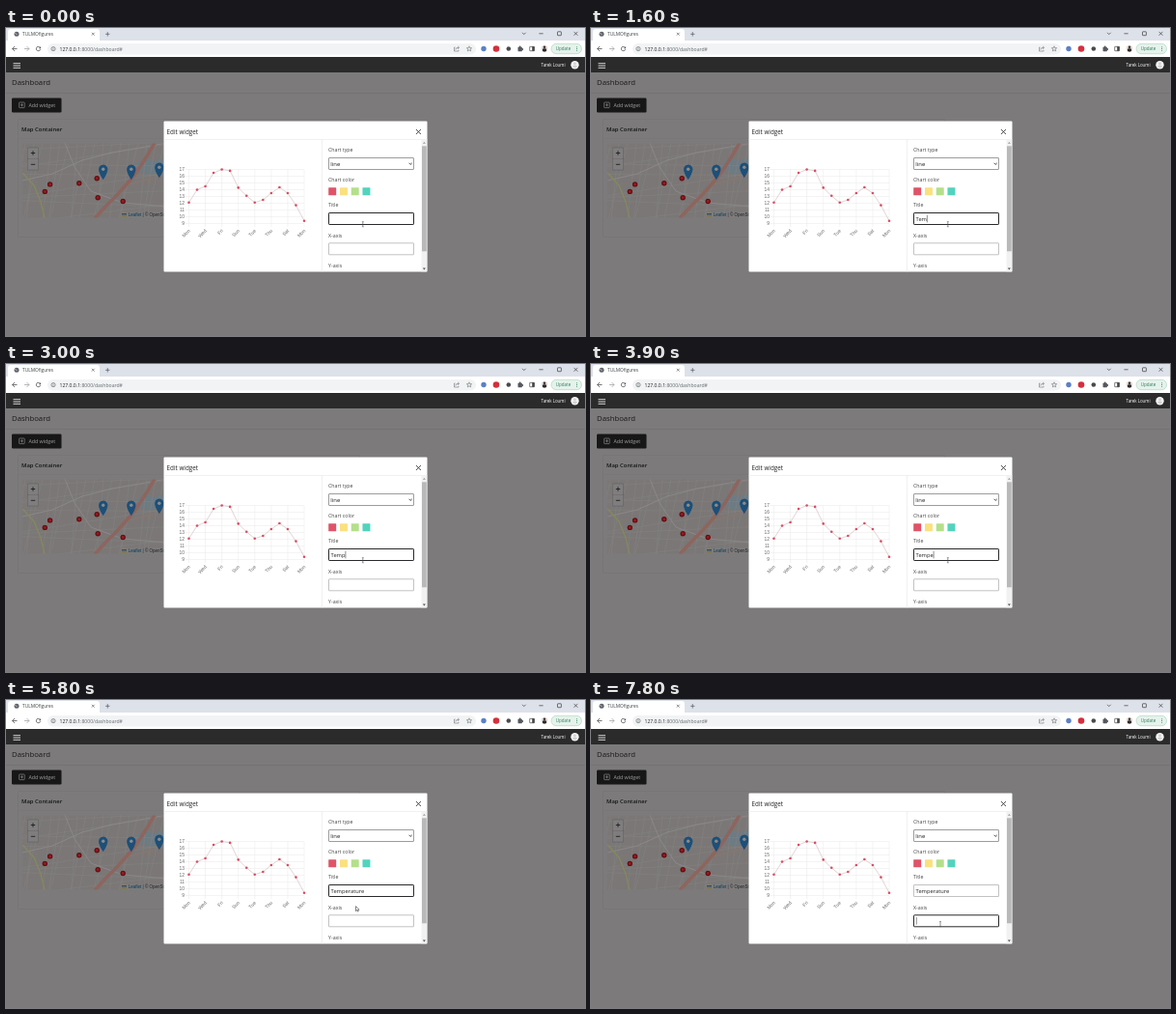
Animation, 600 px wide and 319 px high, one loop 8000 ms. Source, as an HTML page with a canvas:

```html
<!DOCTYPE html>
<html lang="en">
<head>
<meta charset="utf-8">
<title>Dashboard</title>
<style>
html, body { margin: 0; width: 100%; height: 100%; overflow: hidden; background: #7c7a7b; }
canvas { display: block; width: 600px; height: 319px; }
</style>
</head>
<body>
<canvas id="stage"></canvas>
<script>
const W = 600, H = 319, LOOP = 8000;
const UI = '"Open Sans", "Noto Sans", sans-serif';
const ARIAL = '"Liberation Sans", Arial, sans-serif';
const canvas = document.getElementById('stage');
const ratio = window.devicePixelRatio || 1;
canvas.width = W * ratio;
canvas.height = H * ratio;
const c = canvas.getContext('2d');
c.scale(ratio, ratio);

function rect(x, y, w, h, fill, r = 0) {
  c.fillStyle = fill;
  c.beginPath();
  c.roundRect(x, y, w, h, r);
  c.fill();
}
function frame(x, y, w, h, color, width = 1, r = 0) {
  c.strokeStyle = color;
  c.lineWidth = width;
  c.beginPath();
  c.roundRect(x, y, w, h, r);
  c.stroke();
}
function dot(x, y, r, fill) {
  c.fillStyle = fill;
  c.beginPath();
  c.arc(x, y, r, 0, Math.PI * 2);
  c.fill();
}
function ring(x, y, r, color, width, from = 0, to = Math.PI * 2) {
  c.strokeStyle = color;
  c.lineWidth = width;
  c.beginPath();
  c.arc(x, y, r, from, to);
  c.stroke();
}
function path(points, color, width = 1, fill) {
  c.beginPath();
  points.forEach(([x, y]) => c.lineTo(x, y));
  if (fill) {
    c.closePath();
    c.fillStyle = fill;
    c.fill();
  }
  if (color) {
    c.strokeStyle = color;
    c.lineWidth = width;
    c.stroke();
  }
}
const line = (x1, y1, x2, y2, color, width) => path([[x1, y1], [x2, y2]], color, width);
function cross(x, y, r, color, width) {
  line(x - r, y - r, x + r, y + r, color, width);
  line(x - r, y + r, x + r, y - r, color, width);
}
function plus(x, y, r, color, width) {
  line(x - r, y, x + r, y, color, width);
  line(x, y - r, x, y + r, color, width);
}
function text(str, x, y, size, color, { weight = 400, align = 'left', font = UI } = {}) {
  c.font = `${weight} ${size}px ${font}`;
  c.fillStyle = color;
  c.textAlign = align;
  c.fillText(str, x, y);
  return c.measureText(str).width;
}

function drawBrowser() {
  const ink = '#55585c', control = '#3a3a3c';
  rect(0, 0, W, 14, '#dde1e9');
  rect(2, 1, 95, 15, '#fff', 3);
  rect(0, 13, W, 17, '#fff');
  dot(11, 6.3, 2.5, '#5f6368');
  line(9.2, 5.5, 11.6, 6.6, '#d5d7da', 0.7);
  text('TULMOfigures', 17, 8.4, 4.8, '#3c4043');
  cross(90.3, 6.2, 1.4, ink, 0.7);
  plus(105.3, 6.3, 2.2, ink, 0.7);
  path([[535, 4.8], [536.8, 6.6], [538.6, 4.8]], control, 0.7);
  line(552.4, 5.8, 556.6, 5.8, control, 0.7);
  frame(571.5, 3.8, 3.9, 3.9, control, 0.7, 0.5);
  cross(590.5, 5.8, 1.9, control, 0.7);

  line(6.5, 21.5, 11.5, 21.5, ink, 0.8);
  path([[9, 19], [6.5, 21.5], [9, 24]], ink, 0.8);
  line(19, 21.5, 24, 21.5, '#a6a8ab', 0.8);
  path([[21.5, 19], [24, 21.5], [21.5, 24]], '#a6a8ab', 0.8);
  ring(33.5, 21.5, 2.2, ink, 0.8, 0.2, 5.4);
  path([[36.1, 18.9], [36.1, 21.3], [33.8, 21.3]], null, 0, ink);

  rect(43, 16, 444, 11.5, '#f1f3f4', 5.7);
  ring(49, 21.6, 2.1, ink, 0.6);
  line(49, 21.2, 49, 22.9, ink, 0.6);
  line(49, 20, 49, 20.6, ink, 0.6);
  const host = text('127.0.0.1', 55.5, 23.6, 5.1, '#202124');
  text(':8000/dashboard#', 55.5 + host, 23.6, 5.1, '#65696d');

  path([[465.5, 20], [464.5, 20], [464.5, 24], [469, 24], [469, 22.8]], ink, 0.5);
  path([[465.8, 22.6], [466.6, 20.8], [469.3, 20.3]], ink, 0.5);
  path([[468, 18.8], [469.6, 20.3], [468, 21.8]], ink, 0.5);
  path(Array.from({ length: 11 }, (_, i) => {
    const r = i % 2 ? 1.2 : 2.8, a = i * Math.PI / 5 - Math.PI / 2;
    return [480 + r * Math.cos(a), 21.6 + r * Math.sin(a)];
  }), ink, 0.5);

  dot(495, 21.5, 2.7, '#5c7fc4');
  dot(508, 21.5, 3.3, '#d2303c');
  dot(520.8, 21.5, 2.3, '#4a4a4a');
  rect(530.5, 19.8, 4.4, 4.4, ink, 0.6);
  dot(532.6, 19.5, 1, ink);
  dot(535.1, 22, 1, ink);
  frame(542.7, 19.3, 4.7, 4.4, '#444', 0.7, 0.4);
  rect(545.2, 19.2, 2.4, 4.6, '#444');
  dot(558, 21.5, 3.4, '#e4dfdc');
  dot(558, 19.8, 1.3, '#44342c');
  rect(555.9, 21.3, 4.2, 3.2, '#2b2626', 1.4);
  rect(565, 16.3, 31.5, 10.4, '#e6f2ec', 5.2);
  frame(565, 16.3, 31.5, 10.4, '#a5d2b6', 0.6, 5.2);
  text('Update', 569.8, 23.3, 4.5, '#2a7f5c');
  for (const y of [19.7, 21.5, 23.3]) dot(591.6, y, 0.5, '#2a7f5c');
}

function drawPin(x, tip) {
  c.fillStyle = '#1d4f78';
  c.beginPath();
  c.arc(x, tip - 11, 4.7, Math.PI * 0.95, Math.PI * 2.05);
  c.quadraticCurveTo(x + 4, tip - 6, x, tip);
  c.quadraticCurveTo(x - 4, tip - 6, x - 4.7, tip - 10.3);
  c.fill();
  dot(x, tip - 11, 1.7, '#8a8a8a');
}

function drawMap() {
  c.save();
  c.beginPath();
  c.rect(17, 119.5, 150, 77);
  c.clip();
  rect(17, 119.5, 150, 77, '#7a7776');
  path([[134, 142], [145, 134], [153, 138], [167, 133], [167, 147], [146, 152]], null, 0, '#6d7b83');

  // Side streets fan out at slightly varied angles.
  for (let i = 0; i < 17; i++) {
    const x = 20 + i * 9, sway = 7 * Math.sin(i * 2.3);
    line(x, 119, x - 13 + sway, 197, '#848281', 0.6);
  }
  for (let i = 0; i < 8; i++) {
    const y = 126 + i * 10, sway = 8 * Math.sin(i * 1.9);
    line(17, y + sway, 167, y - 8 - sway, '#848281', 0.6);
  }
  path([[17, 158], [48, 151], [79, 137], [110, 129], [167, 119]], '#8a8887', 1);
  path([[61, 119], [71, 144], [88, 169], [121, 181], [167, 185]], '#8a8887', 1);
  path([[17, 150], [29, 163], [36, 180], [40, 197]], '#85875f', 1.4);
  path([[124, 163], [146, 157], [167, 151]], '#87766f', 1.4);
  path([[92, 197], [103, 185], [115, 173], [124, 163], [134, 151], [144, 136], [154, 119]], '#8d655f', 3.6);

  for (const [x, y] of [[45.6, 161.9], [40.3, 169.4], [75.8, 160.8], [94.2, 155.7], [95.2, 175.7], [121.2, 179.5]]) {
    dot(x, y, 2.7, '#5e1115');
    dot(x, y, 1.4, '#a5161c');
  }
  for (const [x, y] of [[100.7, 157.3], [129.8, 157.3], [158.8, 155.3]]) drawPin(x, y);

  rect(22, 123.5, 12, 24, '#666', 1.5);
  rect(22.7, 124.2, 10.6, 11, '#7f7d7e', 1);
  rect(22.7, 135.7, 10.6, 11, '#7f7d7e', 1);
  plus(28, 129.5, 2.2, '#161616', 0.8);
  line(25.8, 141.3, 30.2, 141.3, '#161616', 0.8);

  rect(118.5, 190.5, 50, 6, '#7e7c7d');
  rect(120, 192, 5, 1.6, '#274d82');
  rect(120, 193.6, 5, 1.6, '#85771d');
  const brand = text('Leaflet', 126.8, 195.2, 4.5, '#073c53', { font: ARIAL });
  text(' | © OpenStreetMap', 126.8 + brand, 195.2, 4.5, '#222', { font: ARIAL });
  c.restore();
}

function drawPage() {
  rect(0, 30, W, H - 30, '#7c7a7b');
  rect(0, 30, W, 16, '#2b2b2c');
  for (const y of [36.7, 39, 41.3]) line(7.5, y, 15, y, '#e8e8e8', 0.9);
  text('Tarek Loumi', 579.5, 40.3, 4.4, '#fff', { align: 'right' });
  dot(589.5, 38.2, 4.2, '#f4f4f4');
  dot(589.5, 37, 1.4, '#d0d0d0');
  rect(587.3, 38.8, 4.4, 2.2, '#d0d0d0', 1.1);

  text('Dashboard', 6, 59.2, 7.75, '#1a1a1a');
  line(0, 67.5, W, 67.5, '#737172', 0.7);
  rect(6, 72.5, 51.5, 15, '#171718', 1.2);
  frame(13.6, 77, 5.6, 5.6, '#989898', 0.6, 0.6);
  plus(16.4, 79.8, 1.6, '#989898', 0.6);
  text('Add widget', 23.4, 82.1, 5.3, '#a0a0a0');

  frame(12.5, 94.5, 354, 122, '#757374', 0.6, 1);
  line(12.5, 114.5, 164, 114.5, '#767475', 0.5);
  text('Map Container', 16, 107.3, 5.9, '#161616', { weight: 600 });
  drawMap();
}

function drawChart() {
  const left = 189.5, top = 146.5, step = 119.5 / 14;
  const values = [12.1, 14, 14.5, 16.5, 17, 16.8, 14.3, 13.1, 12.1, 12.5, 13.5, 14.35, 13.5, 11.7, 9.4];
  const days = ['Mon', 'Wed', 'Fri', 'Sun', 'Tue', 'Thu', 'Sat', 'Mon'];
  for (let v = 17; v >= 9; v--) {
    const y = top + (17 - v) * 7;
    line(186, y, 309, y, '#e8e8e8', 0.5);
    text(v, 185, y + 1.8, 4.9, '#666', { align: 'right', font: ARIAL });
  }
  days.forEach((day, i) => {
    const x = left + i * 2 * step;
    line(x, top, x, 206, '#e8e8e8', 0.5);
    c.save();
    c.translate(x + 0.8, 209.5);
    c.rotate(-Math.PI / 4);
    text(day, 0, 1.2, 4.9, '#666', { align: 'right', font: ARIAL });
    c.restore();
  });
  const points = values.map((v, i) => [left + i * step, top + (17 - v) * 7]);
  path(points, '#d8cacd', 0.8);
  points.forEach(([x, y]) => dot(x, y, 1.3, '#dc4c62'));
}

function drawInput(y, focused) {
  if (focused) frame(334.5, y, 88, 12, '#2a2a2c', 1, 0.6);
  else frame(334.5, y, 88, 12, '#a8a8a8', 0.7, 0.4);
}
const drawCaret = (x, y) => line(x, y, x, y + 7.6, '#444', 0.6);

// Each edit of the title: time and the text it leaves.
const edits = [
  [-800, ''], [1200, 'T'], [1300, 'Te'], [1500, 'Tem'], [1800, 'Temp'], [2300, 'Tempa'],
  [2800, 'Temp'], [3800, 'Tempe'], [4300, 'Temper'], [4400, 'Tempera'], [4600, 'Temperat'],
  [4900, 'Temperatur'], [5000, 'Temperature']
];
const moves = [
  [0, 369.8, 203.2], [5500, 368.5, 203], [5800, 363, 216], [5900, 362.5, 222.5],
  [6000, 362, 228], [6100, 362, 231], [7500, 362, 231.5], [7800, 362, 232]
];
const FOCUS_TIME = 6400, FOCUS_BLINK = 6500;
const latest = (steps, t) => steps.filter(s => s[0] <= t).pop();
const caretOn = (t, since) => t >= since && (t - since) % 1000 < 500;

function drawForm(t) {
  const second = t >= FOCUS_TIME;
  const [typedAt, title] = latest(edits, t);
  const label = (str, y) => text(str, 334, y, 5.25, '#444');

  label('Chart type', 128.3);
  frame(334.5, 134.5, 88, 12, '#858585', 0.8, 0.5);
  text('line', 336.3, 142.6, 5.9, '#222');
  path([[417.6, 139.8], [419.2, 141.4], [420.8, 139.8]], '#333', 0.9);
  label('Chart color', 159.3);
  ['#df5468', '#fbe080', '#b5df8b', '#53d3be'].forEach((color, i) =>
    rect(334.2 + i * 11.75, 165.2, 8, 8, color, 0.5));

  label('Title', 185.4);
  drawInput(191.5, !second);
  const width = text(title, 336.6, 199.9, 5.75, '#222');
  if (!second && caretOn(t, typedAt)) drawCaret(337 + width, 193.8);

  label('X-axis', 216.5);
  drawInput(222.8, second);
  if (second && caretOn(t, FOCUS_BLINK)) drawCaret(337.3, 225);
  label('Y-axis', 247.6);
}

function drawModal(t) {
  rect(163.5, 96.5, 273, 156, '#fff', 1);
  text('Edit widget', 166.6, 110.3, 6.3, '#222', { weight: 500 });
  cross(427.4, 107.5, 2.5, '#333', 0.9);
  line(163.5, 115.5, 436.5, 115.5, '#e7e7e7', 0.6);
  line(327.5, 115.5, 327.5, 252.5, '#e7e7e7', 0.6);
  rect(430.6, 116, 5.6, 136.2, '#f1f1f1');
  rect(431, 122.3, 4.8, 109, '#b9b9b9');
  path([[431.9, 119.8], [433.4, 118], [434.9, 119.8]], null, 0, '#9a9a9a');
  path([[431.9, 248.6], [433.4, 250.4], [434.9, 248.6]], null, 0, '#505050');
  drawChart();
  drawForm(t);
}

function drawPointer(t) {
  const [, x, y] = latest(moves, t);
  const overTitle = y > 191 && y < 204, overAxis = y > 222 && y < 236;
  if (overTitle || overAxis) {
    line(x, y - 2.6, x, y + 2.6, '#444', 0.6);
    line(x - 1, y - 2.6, x + 1, y - 2.6, '#555', 0.5);
    line(x - 1, y + 2.6, x + 1, y + 2.6, '#555', 0.5);
  } else {
    const shape = [[0, 0], [0, 5], [1.2, 4], [2, 5.6], [2.7, 5.2], [2, 3.7], [3.5, 3.6], [0, 0]];
    path(shape.map(([dx, dy]) => [x - 0.5 + dx, y - 2.4 + dy]), '#333', 0.6, '#fff');
  }
}

const start = performance.now();
function draw() {
  const t = (performance.now() - start) % LOOP;
  drawPage();
  drawBrowser();
  drawModal(t);
  drawPointer(t);
  requestAnimationFrame(draw);
}
draw();
</script>
</body>
</html>
```
